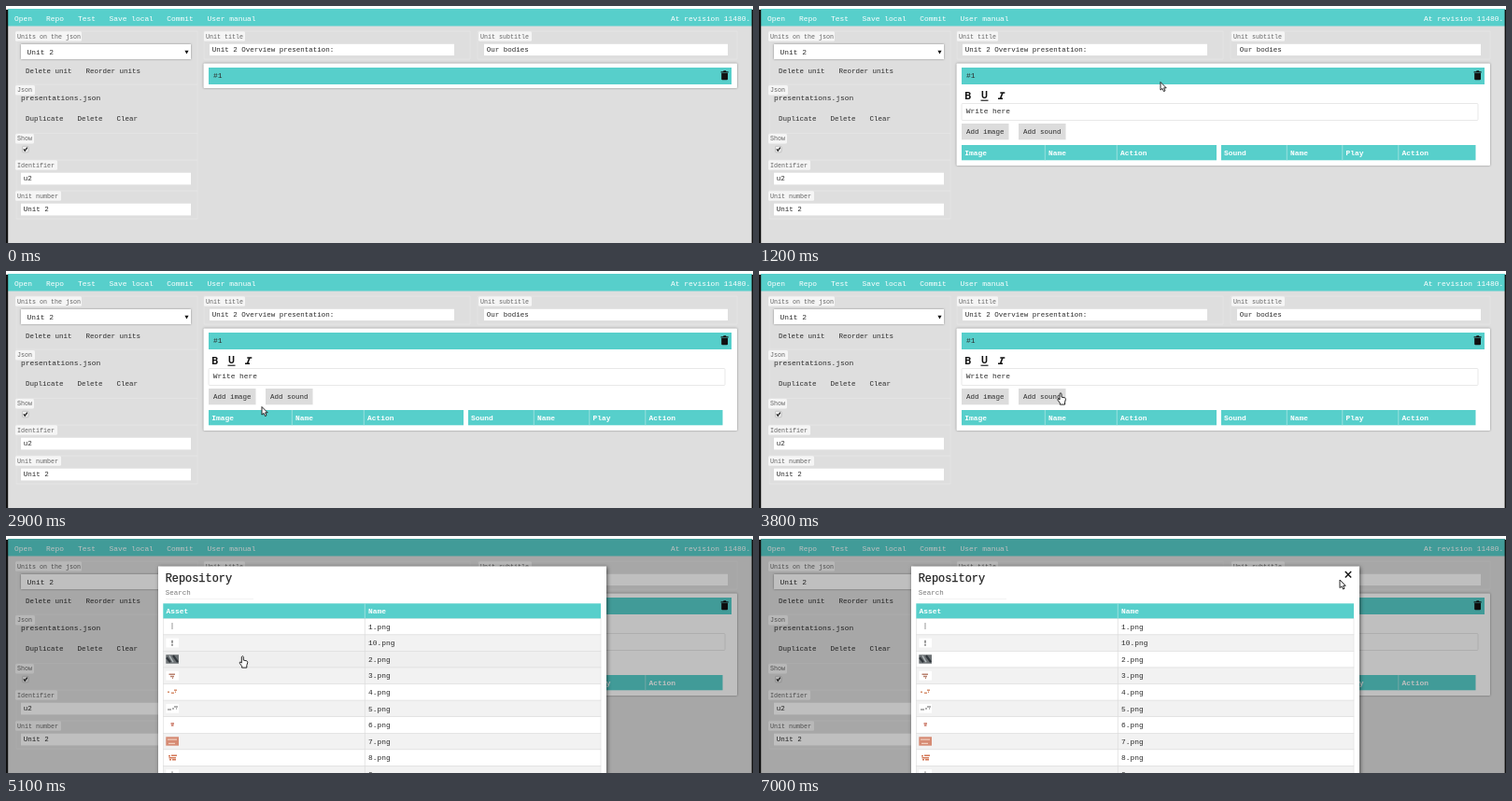
An HTML page for the animation above (7.1 s loop, 800 by 254 pixels).

```html
<!DOCTYPE html>
<html lang="en">
<head>
<meta charset="utf-8">
<title>Presentation editor</title>
<style>
  html, body { margin: 0; width: 100%; height: 100%; overflow: hidden; background: #dedede; }
  svg { display: block; width: 100%; height: 100%; }
  text { font-family: "Liberation Mono", "DejaVu Sans Mono", monospace; white-space: pre; }
  .shadow { filter: drop-shadow(0 .7px 1px rgba(0, 0, 0, .4)); }
</style>
</head>
<body>
<svg id="stage" viewBox="0 0 800 254" xmlns="http://www.w3.org/2000/svg">
  <g id="page"></g>
  <g id="card"></g>
  <g id="modal"></g>
  <g id="frame"></g>
  <g id="cursor">
    <path id="arrow" d="M0 0V8.6L2 6.9L3.5 10L5 9.3L3.6 6.3H6.2Z" fill="#fff" stroke="#111" stroke-width=".9"/>
    <path id="hand" d="M-1 1Q0 -.6 1 1V4.6L4.6 5.4Q5.6 5.8 5.4 7.2L4.5 10.2V12.6H-.7V11L-3 7.9Q-3.5 6.4 -2.2 6.5L-1 7.6Z" fill="#fff" stroke="#111" stroke-width=".9"/>
  </g>
</svg>
<script>
const TEAL = '#57cfcb', INK = '#2b2b2b', LOOP = 7100;
const $ = id => document.getElementById(id);

function add(parent, tag, attrs, content) {
  const el = document.createElementNS('http://www.w3.org/2000/svg', tag);
  for (const k in attrs) el.setAttribute(k, attrs[k]);
  if (content) el.textContent = content;
  return parent.appendChild(el);
}
const rect = (p, x, y, x2, y2, fill, more) =>
  add(p, 'rect', { x, y, width: x2 - x, height: y2 - y, fill, ...more });
const text = (p, x, y, str, size = 7.9, fill = INK, more) =>
  add(p, 'text', { x, y, 'font-size': size, fill, ...more }, str);
const path = (p, d, stroke, width = 1, more) =>
  add(p, 'path', { d, stroke, 'stroke-width': width, fill: 'none', ...more });

function legend(p, x, y, x2, str) {
  rect(p, x, y, x2, y + 10.5, '#f5f5f5', { rx: 1.5 });
  text(p, x + 2, y + 7.4, str, 6.67, '#666');
}
function input(p, x, y, x2, y2, str, size = 7.5) {
  rect(p, x, y, x2, y2, '#fff');
  text(p, x + 2.8, y + 8.4, str, size);
}
function tableHead(p, x, y, x2, y2, cells) {
  rect(p, x, y, x2, y2, TEAL);
  cells.forEach(([cx, str], i) => {
    if (i) path(p, `M${cx - 3.7} ${y}V${y2}`, '#a9e5e3', .8);
    text(p, cx, (y + y2) / 2 + 2.5, str, 7.9, '#fff', { 'font-weight': 700 });
  });
}

function buildPage(p) {
  rect(p, 0, 0, 800, 254, '#dedede');
  rect(p, 2, 3, 799, 21.5, TEAL);
  [[9, 'Open'], [43, 'Repo'], [77, 'Test'], [110.5, 'Save local'], [172.3, 'Commit'],
   [215.5, 'User manual'], [712, 'At revision 11480.']]
    .forEach(([x, s]) => text(p, x, 15.5, s, 7.9, '#fff'));

  // fieldset outlines
  path(p, 'M11 27H205V228H11ZM11 84H205M11 136.5H205M11 165H205M11 198H205' +
    'M212 27H497V57H212ZM505 27H783V57H505Z', '#e7e7e7', .7);

  legend(p, 10, 27.3, 81, 'Units on the json');
  rect(p, 16, 41, 198, 57, '#fff', { class: 'shadow' });
  text(p, 22.5, 51.8, 'Unit 2');
  add(p, 'path', { d: 'M191.4 47.7H195.6L193.5 51.5Z', fill: '#111' });
  text(p, 21, 71.7, 'Delete unit', 7.5);
  text(p, 85.5, 71.7, 'Reorder units', 7.5);
  legend(p, 10, 85, 31, 'Json');
  text(p, 16, 101.2, 'presentations.json');
  [[21, 'Duplicate'], [76.5, 'Delete'], [118.5, 'Clear']]
    .forEach(([x, s]) => text(p, x, 123.4, s, 7.5));
  legend(p, 10, 137, 30, 'Show');
  rect(p, 17.5, 150.3, 24, 156.8, '#eee', { rx: 1, stroke: '#aaa', 'stroke-width': .6 });
  path(p, 'M18.9 153.4L20.2 155.2L22.8 151.6', '#222', 1.3);
  legend(p, 10, 165.3, 55, 'Identifier');
  input(p, 16, 178.7, 198, 191.4, 'u2');
  legend(p, 10, 198.3, 59, 'Unit number');
  input(p, 16, 211.7, 198, 224.4, 'Unit 2');
  legend(p, 212, 27.3, 256, 'Unit title');
  input(p, 218, 40.8, 480, 53, 'Unit 2 Overview presentation:');
  legend(p, 506, 27.3, 563, 'Unit subtitle');
  input(p, 512, 40.8, 773, 53, 'Our bodies');
}

function buildCard(p) {
  const back = rect(p, 211.5, 61.5, 783, 88, '#fff', { rx: 1, class: 'shadow' });
  rect(p, 217, 66, 777, 84, TEAL);
  text(p, 222, 77.4, '#1');
  add(p, 'path', { d: 'M765.6 70.2H768L768.6 69.3H770.9L771.5 70.2H773.6V71.4H765.6ZM766.2 72.1H773V78.2Q773 79.2 772 79.2H767.2Q766.2 79.2 766.2 78.2Z', fill: '#111' });

  const body = add(p, 'g');
  const sans = { 'font-weight': 700, style: 'font-family:Roboto,sans-serif' };
  text(body, 220.3, 99.8, 'B', 11, '#111', sans);
  text(body, 238, 99, 'U', 10.5, '#111', sans);
  path(body, 'M237.5 101.2H245.5', '#111', 1.1);
  path(body, 'M258.3 93H263.3M256 99.2H261M260.9 93L258.5 99.2', '#111', 1.6);
  rect(body, 217, 104.5, 770, 122.5, '#fff', { stroke: '#e2e2e2', 'stroke-width': .8, rx: 1 });
  text(body, 221.7, 115.2, 'Write here');
  rect(body, 217, 126, 267.5, 143.3, '#dcdcdc');
  rect(body, 278, 126, 328.5, 143.3, '#dcdcdc');
  text(body, 222, 137, 'Add image', 7.5);
  text(body, 283, 137, 'Add sound', 7.5);
  const focus = rect(body, 217.3, 126.3, 267.2, 143, 'none',
    { stroke: '#4b86b8', 'stroke-width': .9, 'stroke-dasharray': '1 .7' });
  tableHead(body, 217, 149, 490, 165.3, [[220.3, 'Image'], [310, 'Name'], [387, 'Action']]);
  tableHead(body, 495, 149, 767.5, 165.3,
    [[498, 'Sound'], [569, 'Name'], [628.5, 'Play'], [688.5, 'Action']]);
  return { back, body, focus };
}

const ROW0 = 88.3, ROW = 17.57;

// small asset previews: [colour, path] relative to the row centre
const THUMBS = [
  ['#bbb', 'M178 -4V3'],
  ['#777', 'M178 -3V0M178 1V3'],
  null,
  ['#b98270', 'M174.5 -1.5H181M176 .8H180M178 2.5H179'],
  ['#d6906f', 'M173 0H175M177 1H180M180 -2H183M181 0H182'],
  ['#999', 'M173 1H177M178 0H180M180 -2H184M182 0H183'],
  ['#c7705d', 'M176.5 -1.5H180M177 .5H179.5'],
  null,
  ['#d47958', 'M174 -2H176M177 -2.5H183M174.5 0H182M175 2H177M178 2H182'],
  ['#aaa', 'M178 -3V3']
];

function thumb(p, i, y) {
  if (i === 2) {
    rect(p, 171.3, y - 5, 185, y + 4.5, '#6d7275');
    path(p, `M172 ${y - 2}L176 ${y + 3}M179 ${y - 4}L184 ${y + 3}`, '#30363b', 2.2);
    path(p, `M175 ${y - 4}L179 ${y + 3}`, '#b5bdc0', 1.4);
  } else if (i === 7) {
    rect(p, 171.3, y - 4.8, 185, y + 4.6, '#d68b74');
    path(p, `M173 ${y - 2}H183M174 ${y + 2.2}H181`, '#f1d0bf', 1.3);
  } else {
    rect(p, 171.3, y - 5, 185, y + 4.8, '#fff');
    path(p, THUMBS[i][1], THUMBS[i][0], 1.5, { transform: `translate(0 ${y})` });
  }
}

function buildModal(p) {
  rect(p, 2, 3, 799, 254, '#000', { opacity: .25 });
  rect(p, 163, 32.5, 643, 270, '#fff', { style: 'filter:drop-shadow(1px 1px 2px rgba(0,0,0,.55))' });
  text(p, 170.7, 48.7, 'Repository', 11.9, '#222', { stroke: '#222', 'stroke-width': .25 });
  text(p, 170.7, 62.6, 'Search', 7.5, '#777');
  path(p, 'M171 67.5H265', '#eee', .7);
  const rows = THUMBS.map((_, i) => {
    const y = ROW0 + i * ROW, mid = y + ROW / 2;
    const bg = rect(p, 168.3, y, 637, y + ROW, '#fff', { stroke: '#ddd', 'stroke-width': .6 });
    thumb(p, i, mid);
    const name = i === 0 ? 1 : i === 1 ? 10 : i;
    text(p, 388, mid + 2.6, name + '.png');
    return bg;
  });
  path(p, 'M384.4 88V254', '#ddd', .7);
  tableHead(p, 168.3, 72.3, 637, 88.3, [[171.5, 'Asset'], [388, 'Name']]);
  const close = path(p, 'M627.8 38L634.2 44.4M634.2 38L627.8 44.4', '#111', 1.4);
  return { rows, close };
}

buildPage($('page'));
const card = buildCard($('card'));
const modal = buildModal($('modal'));
rect($('frame'), 0, 0, 800, 3, '#fff');
rect($('frame'), 0, 4, 2.2, 254, '#111');
rect($('frame'), 798.6, 4, 800, 254, '#111');

// pointer path: time, x, y
const TRACK = [
  [100, 470, 200], [700, 430, 81.5], [1500, 430, 81.5], [2300, 310, 122], [2900, 274, 145.5],
  [3100, 274, 145.5], [3800, 323, 130.5], [3900, 323, 130.5], [4500, 253, 128.5],
  [5500, 253.5, 128.5], [6300, 440, 112], [7000, 622, 47]
];

function pointAt(t) {
  const n = Math.max(1, TRACK.findIndex(k => k[0] >= t));
  const [a, b] = [TRACK[n - 1], TRACK[n]];
  let u = Math.min(1, Math.max(0, (t - a[0]) / (b[0] - a[0])));
  u = u * u * (3 - 2 * u);
  return [a[1] + (b[1] - a[1]) * u, a[2] + (b[2] - a[2]) * u];
}

const show = (el, on) => el.setAttribute('visibility', on ? 'inherit' : 'hidden');

function draw(ms) {
  const t = Math.floor((ms % LOOP) / 100) * 100; // ten steps a second
  const open = t >= 1200, popup = t >= 5100;
  const [x, y] = pointAt(t);

  card.back.setAttribute('height', open ? 109.5 : 26.5);
  show(card.body, open);
  show(card.focus, t >= 4900);
  show($('modal'), popup);
  show(modal.close, t >= 5200);

  const row = popup && x > 168 && x < 637 ? Math.floor((y - ROW0) / ROW) : -1;
  modal.rows.forEach((r, i) => r.setAttribute('fill', i === row ? '#efefef' : i % 2 ? '#f2f2f2' : '#fff'));

  const onButton = open && !popup && y > 126 && y < 143.3 &&
    ((x > 217 && x < 267.5) || (x > 278 && x < 328.5));
  const hand = onButton || row >= 0;
  show($('cursor'), t >= 100);
  show($('hand'), hand);
  show($('arrow'), !hand);
  $('cursor').setAttribute('transform', `translate(${x.toFixed(2)} ${y.toFixed(2)})`);
}

const start = performance.now();
function tick() {
  draw(performance.now() - start);
  requestAnimationFrame(tick);
}
tick();
</script>
</body>
</html>
```
